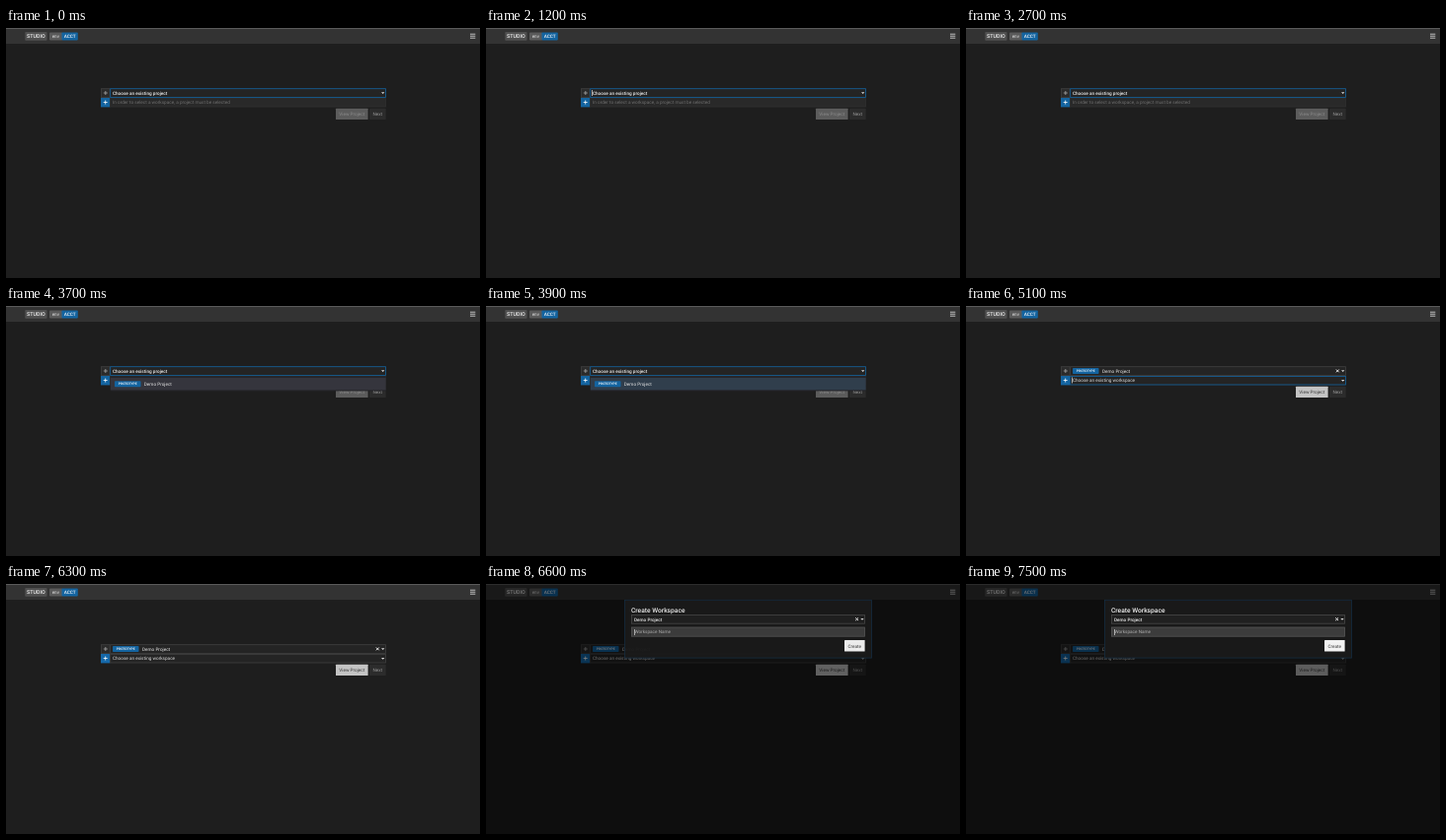
Animation of 480 by 254 pixels, one loop 8 s. Source, as an HTML page:

```html
<!DOCTYPE html>
<html lang="en">
<head>
<meta charset="utf-8">
<title>Choose project and workspace</title>
<style>
  html, body { margin: 0; width: 100%; height: 100%; overflow: hidden; background: #1e1e1e; }
  svg { display: block; width: 100%; height: 100%; }
  text { font-family: Roboto, Arial, sans-serif; text-rendering: geometricPrecision; white-space: pre; }
</style>
</head>
<body>
<svg id="stage" viewBox="0 0 480 254" preserveAspectRatio="none"></svg>
<script>
const LOOP = 8000;
const BLUE = '#1464a0';
const stage = document.getElementById('stage');

// Markup helpers
const rect = (x, y, w, h, fill, extra = '') =>
  `<rect x="${x}" y="${y}" width="${w}" height="${h}" fill="${fill}" ${extra}/>`;
const label = (x, y, str, fill, size = 4.67, weight = 400, extra = '') =>
  `<text x="${x}" y="${y}" fill="${fill}" font-size="${size}" font-weight="${weight}" ${extra}>${str}</text>`;
const path = (d, stroke, width = 0.8) =>
  `<path d="${d}" fill="none" stroke="${stroke}" stroke-width="${width}"/>`;
const group = (id, body) => `<g id="${id}">${body}</g>`;

const field = (id, x, y, w, h, fill, stroke) =>
  rect(x + 0.4, y + 0.4, w - 0.8, h - 0.8, fill, `id="${id}" stroke="${stroke}" stroke-width=".8"`);
const arrow = (x, y) => `<path d="M${x - 1.7} ${y - 0.8}h3.4l-1.7 1.8z" fill="#ddd"/>`;
const cross = (x, y) => path(`M${x - 1.4} ${y - 1.4}l2.8 2.8m0 -2.8l-2.8 2.8`, '#eee', 1);
const plus = (x, y, color) => path(`M${x - 2} ${y}h4m-2 -2v4`, color);
const badge = (x, y) =>
  rect(x, y, 26.5, 6, BLUE, 'rx=".7"') +
  label(x + 13.25, y + 4.2, 'PROTOTYPE', '#e4eef6', 3.33, 700, 'text-anchor="middle"');
const button = (id, x, y, w, h, str, fill, ink) =>
  group(id, rect(x, y, w, h, fill, 'rx=".5"') +
    label(x + w / 2, y + h / 2 + 1.7, str, ink, 4.67, 400, 'text-anchor="middle"'));
const caret = (id, x, y) => rect(x, y, 0.8, 6, '#ccc', `id="${id}"`);

const topBar =
  rect(0, 0, 480, 16, '#333') + rect(0, 0, 480, 0.9, '#606060') +
  rect(19.3, 4, 22.2, 8.8, '#505050', 'rx=".8"') +
  label(30.4, 10.3, 'STUDIO', '#f2f2f2', 5.33, 500, 'text-anchor="middle"') +
  rect(44, 4.4, 13.5, 8, '#5a5a5a', 'rx=".8"') +
  label(50.3, 10, 'env', '#e8e8e8', 4.67, 400, 'text-anchor="middle"') +
  rect(56.5, 4.4, 16.3, 8, BLUE, 'rx=".8"') +
  label(64.7, 10, 'ACCT', '#f0f4f8', 4.67, 500, 'text-anchor="middle"') +
  path('M470 6.2h5.3m-5.3 2h5.3m-5.3 2h5.3', '#d0d0d0', 0.9);

const projectRow =
  field('', 96, 61.3, 9.6, 9.6, '#2b2b2b', '#404040') + plus(100.8, 66, '#a8a8a8') +
  field('project', 105.3, 61.3, 279.5, 9.6, '#242424', BLUE) +
  group('projectEmpty', label(108, 67.7, 'Choose an existing project', '#eee', 4.67, 500)) +
  group('projectValue', badge(108, 63) + label(138, 67.7, 'Demo Project', '#eee') + cross(376.3, 65.9)) +
  arrow(381.7, 66) + caret('projectCaret', 107, 63);

const workspaceRow =
  rect(96, 71, 9.4, 9.4, BLUE, 'id="add"') + plus(100.7, 75.5, '#fff') +
  field('workspace', 105.3, 71, 279.5, 9.4, '#292929', '#303030') +
  group('needProject',
    label(108, 77.2, 'In order to select a workspace, a project must be selected', '#707070')) +
  group('loading', label(108, 77.2, 'Loading workspaces', '#707070') +
    `<circle cx="375.2" cy="75.2" r="2" fill="none" stroke="${BLUE}" stroke-width=".8"/>`) +
  group('workspaceEmpty', label(108, 77.2, 'Choose an existing workspace', '#ddd') + arrow(381.7, 75.7)) +
  caret('workspaceCaret', 107, 72.4);

const actions =
  button('viewOff', 334, 81.8, 32.6, 11.2, 'View Project', '#5c5c5c', '#8c8c8c') +
  button('viewOn', 334, 81.8, 32.6, 11.2, 'View Project', '#c4c4c4', '#383838') +
  button('next', 368, 81.8, 16.6, 11.2, 'Next', '#2c2c2c', '#9a9a9a');

const menu = group('menu',
  rect(105.8, 71.4, 278.8, 15, '#25252a') +
  rect(105.8, 73, 278.8, 12.3, '#35353d', 'id="option"') +
  badge(110, 76.2) + label(139.8, 81, 'Demo Project', '#e4e4e4'));

const modal = group('modal',
  rect(0, 0, 480, 254, '#000', 'opacity=".52"') +
  rect(140.4, 16.3, 250, 58.8, '#191919', 'stroke="#142c40" stroke-width=".8"') +
  label(147, 28.6, 'Create Workspace', '#f2f2f2', 6.67, 500) +
  field('', 147, 31, 237, 9.6, '#202020', '#484848') +
  label(150, 37.5, 'Demo Project', '#eee', 4.67, 500) + cross(375.6, 35.7) + arrow(381, 35.8) +
  field('', 147, 43.6, 237, 10, '#3c3c3c', '#555') +
  label(150.4, 50.4, 'Workspace Name', '#b0b0b0') + caret('nameCaret', 150, 46) +
  button('create', 363, 57, 20.6, 11.6, 'Create', '#f2f2f2', '#3a3a3a'));

stage.innerHTML = rect(0, 0, 480, 254, '#1e1e1e') + topBar + projectRow + workspaceRow + actions + menu + modal;

const el = {};
stage.querySelectorAll('[id]').forEach(n => { if (n.id) el[n.id] = n; });

const show = (id, on) => { el[id].style.display = on ? '' : 'none'; };
const ramp = (t, start, span = 100) => Math.min(1, Math.max(0, (t - start) / span));
const mix = (a, b, k) => `rgb(${a.map((v, i) => Math.round(v + (b[i] - v) * k))})`;
const within = (t, a, b) => t >= a && t < b;

const FOCUS = [20, 100, 160], IDLE = [64, 64, 64], DISABLED = [48, 48, 48];

function render(t) {
  const picked = t >= 4200, loaded = t >= 4700;

  show('projectEmpty', !picked);
  show('projectValue', picked);
  show('projectCaret', within(t, 1200, 3700) && (t - 1200) % 1000 < 500);
  el.project.setAttribute('stroke', mix(FOCUS, IDLE, ramp(t, 4650)));

  show('needProject', !picked);
  show('loading', picked && !loaded);
  show('workspaceEmpty', loaded);
  show('workspaceCaret', within(t, 4700, 6200) && (t - 4700) % 1000 < 500);
  el.workspace.setAttribute('fill', loaded ? '#242424' : '#292929');
  el.workspace.setAttribute('stroke', t < 6000
    ? mix(DISABLED, FOCUS, ramp(t, 4650))
    : mix(FOCUS, IDLE, ramp(t, 6150)));
  el.add.setAttribute('fill', t >= 6200 ? '#1669aa' : BLUE);

  show('viewOff', !picked);
  show('viewOn', picked);

  show('menu', within(t, 3000, 4200));
  el.option.setAttribute('fill', t >= 3900 ? '#303e4c' : '#35353d');

  show('modal', t >= 6600);
  el.modal.style.opacity = t < 6700 ? 0.97 : 1;
  show('nameCaret', !within(t, 6900, 7500));
}

const start = performance.now();
function tick() {
  render((performance.now() - start) % LOOP);
  requestAnimationFrame(tick);
}
tick();
</script>
</body>
</html>
```
